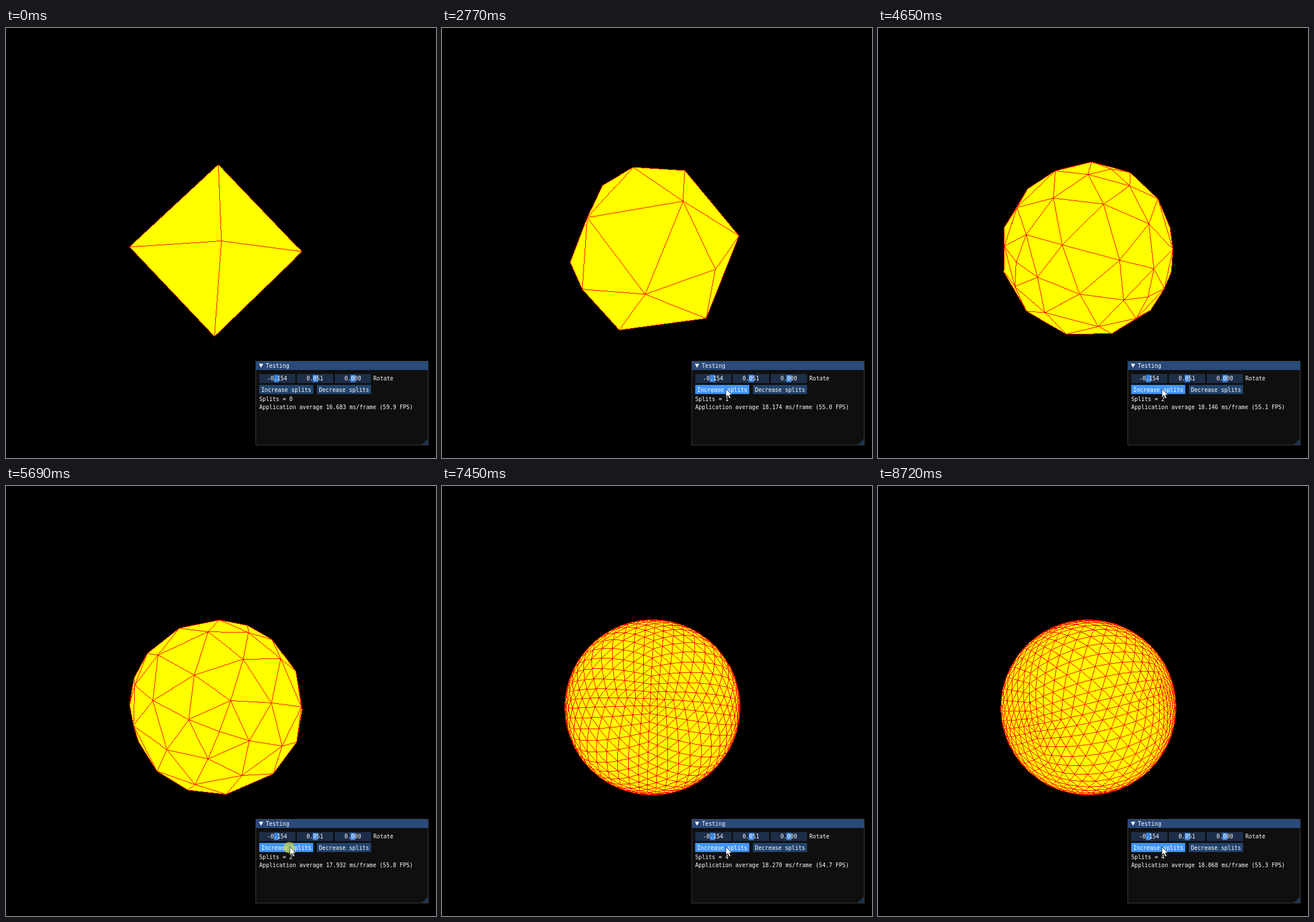
Write an HTML page with a canvas that moves like this. It is 748 by 748 pixels and loops after 8740 ms.

```html
<!DOCTYPE html>
<html lang="en">
<head>
<meta charset="utf-8">
<title>Sphere splits</title>
<style>
  html, body { margin: 0; width: 100%; height: 100%; overflow: hidden; background: #000; }
  canvas { position: absolute; left: 206px; top: 225px; }
  svg { position: absolute; left: 0; top: 0; width: 748px; height: 748px; }
  text { font: 9.67px "DejaVu Sans Mono", "Liberation Mono", monospace; fill: #fff; white-space: pre; }
  .mid { text-anchor: middle; }
</style>
</head>
<body>
<canvas id="stage" width="320" height="320"></canvas>
<svg viewBox="0 0 748 748">
  <rect x="434.5" y="579.5" width="300" height="146" fill="#0f0f0f" stroke="#3c3c44"/>
  <rect x="435" y="580" width="299" height="15" fill="#294a7a"/>
  <path d="M440 584h7.4l-3.7 7z" fill="#fff"/>
  <path d="M734 714v11h-11z" fill="#1b314b"/>
  <text x="452" y="591">Testing</text>

  <g id="sliders"></g>
  <text x="639" y="613.3">Rotate</text>

  <rect id="increase" x="440.5" y="620.9" width="94" height="15.8" fill="#23446c"/>
  <rect x="541" y="620.9" width="94" height="15.8" fill="#23446c"/>
  <text class="mid" x="487.5" y="632.5">Increase splits</text>
  <text class="mid" x="588" y="632.5">Decrease splits</text>
  <text id="splits" x="440.5" y="649"></text>
  <text id="stats" x="440.5" y="663.2"></text>

  <circle id="press" cx="492.5" cy="629" r="10" fill="#dcdc28" fill-opacity=".6"/>
  <path id="cursor" d="M0 0V14L3.3 11L5.8 16.5L8.2 15.4L5.7 10.2H10Z" fill="#fff" stroke="#111" stroke-width=".7"/>
</svg>
<script>
const LOOP = 8740;
const SIZE = 320;
const CENTER = [160, 160], FOCAL = 902, DISTANCE = 6;
const CLICKS = [1700, 3900, 5740, 7000];
const PRESS_TIME = 130;

// Pairs of time and value
const ANGLES = [[0, 2.2], [1860, 83.9], [3640, 173.5], [5690, 271.6], [6740, 319.5], [7450, 358], [8740, 417.5]];
const FRAME_MS = [[0, 16.682], [1860, 17.984], [3640, 18.355], [5690, 17.932], [6740, 18.003], [7450, 18.27], [8720, 18.068], [8740, 18.068]];

const $ = id => document.getElementById(id);
const ctx = $("stage").getContext("2d", { willReadFrequently: true });
const mix = (p, a, q, b) => p.map((v, i) => v * a + q[i] * b);
const cross = (p, q) => [p[1] * q[2] - p[2] * q[1], p[2] * q[0] - p[0] * q[2], p[0] * q[1] - p[1] * q[0]];
const unit = p => { const n = Math.hypot(...p); return p.map(v => v / n); };

function sample(track, t) {
  let i = 1;
  while (i < track.length - 1 && t > track[i][0]) i++;
  const [t0, v0] = track[i - 1], [t1, v1] = track[i];
  return v0 + (v1 - v0) * (t - t0) / (t1 - t0);
}

function octahedron() {
  const faces = [];
  for (const x of [1, -1]) for (const y of [1, -1]) for (const z of [1, -1]) {
    const face = [[x, 0, 0], [0, y, 0], [0, 0, z]];
    faces.push(x * y * z > 0 ? face : face.reverse());
  }
  return faces;
}

function split(faces) {
  const half = (p, q) => mix(p, 0.5, q, 0.5);
  return faces.flatMap(([a, b, c]) => {
    const ab = half(a, b), bc = half(b, c), ca = half(c, a);
    return [[a, ab, ca], [ab, b, bc], [ca, bc, c], [ab, bc, ca]];
  });
}

// Faces are split while flat; only the finished grid is pushed onto the sphere
const flat = [octahedron()];
for (let i = 0; i < CLICKS.length; i++) flat.push(split(flat[i]));
const meshes = flat.map(faces => faces.map(face => face.map(unit)));

// The body spins around a fixed, tilted axis
const axis = unit([0.037, 0.971, 0.235]);
const side = unit(mix([1, 0, 0], 1, axis, -axis[0]));
const depth = cross(axis, side);
const [LEAN_COS, LEAN_SIN] = unit([0.949, 0.314]);

function bodyBasis(degrees) {
  const angle = degrees * Math.PI / 180;
  const right = mix(side, Math.cos(angle), depth, Math.sin(angle));
  const back = cross(axis, right);
  return [
    right,
    mix(axis, LEAN_COS, back, LEAN_SIN),
    mix(axis, LEAN_SIN, back, -LEAN_COS)
  ];
}

function visibleTriangles(faces, [u, v, w]) {
  const project = ([x, y, z]) => {
    const p = mix(mix(u, x, v, y), 1, w, z);
    const scale = FOCAL / (DISTANCE - p[2]);
    return [CENTER[0] + p[0] * scale, CENTER[1] - p[1] * scale];
  };
  return faces.map(face => face.map(project)).filter(([a, b, c]) =>
    (b[0] - a[0]) * (c[1] - a[1]) < (b[1] - a[1]) * (c[0] - a[0]));
}

// One hard pixel per step along the longer direction
function plotLine(pixels, [x0, y0], [x1, y1], color) {
  const steps = Math.max(1, Math.ceil(Math.max(Math.abs(x1 - x0), Math.abs(y1 - y0))));
  for (let i = 0; i <= steps; i++) {
    const x = Math.floor(x0 + (x1 - x0) * i / steps);
    const y = Math.floor(y0 + (y1 - y0) * i / steps);
    pixels[y * SIZE + x] = color;
  }
}

function drawMesh(triangles) {
  ctx.fillStyle = "#000";
  ctx.fillRect(0, 0, SIZE, SIZE);
  ctx.fillStyle = "#ff0";
  ctx.beginPath();
  for (const [a, b, c] of triangles) {
    ctx.moveTo(...a);
    ctx.lineTo(...b);
    ctx.lineTo(...c);
    ctx.closePath();
  }
  ctx.fill();

  const image = ctx.getImageData(0, 0, SIZE, SIZE);
  const pixels = new Uint32Array(image.data.buffer);
  const red = 0xff0000ff;
  for (const [a, b, c] of triangles) {
    for (const [p, q] of [[a, b], [b, c], [c, a]]) {
      // Shared edges always run the same way, so both passes hit the same pixels
      if (p[0] < q[0]) plotLine(pixels, p, q, red);
      else plotLine(pixels, q, p, red);
    }
  }
  ctx.putImageData(image, 0, 0);
}

function buildSliders() {
  $("sliders").innerHTML = [["-0.154", 440.5, 466], ["0.051", 506, 533.5], ["0.000", 572, 599]].map(([value, x, grab]) =>
    `<rect x="${x}" y="601.8" width="63" height="15.8" fill="#1d2e48"/>
     <rect x="${grab}" y="603.5" width="8.8" height="12.5" fill="#3d85e0"/>
     <text class="mid" x="${x + 31.2}" y="613.3">${value}</text>`).join("");
}

function drawCursor(t) {
  const k = Math.min(1, Math.max(0, (t - 250) / 570));
  const ease = 1 - (1 - k) ** 2;
  const x = 520 - 26 * ease, y = 750 - 122 * ease;
  $("cursor").setAttribute("transform", `translate(${x.toFixed(1)} ${y.toFixed(1)})`);
  $("increase").setAttribute("fill", y < 637 ? "#4296fa" : "#23446c");
  const pressed = CLICKS.some(c => t >= c - PRESS_TIME && t < c);
  $("press").setAttribute("visibility", pressed ? "visible" : "hidden");
}

function render(t) {
  const count = CLICKS.filter(c => t >= c).length;
  const ms = sample(FRAME_MS, t);
  drawMesh(visibleTriangles(meshes[count], bodyBasis(sample(ANGLES, t))));
  $("splits").textContent = `Splits = ${count}`;
  $("stats").textContent = `Application average ${ms.toFixed(3)} ms/frame (${(1000 / ms).toFixed(1)} FPS)`;
  drawCursor(t);
}

buildSliders();
const start = performance.now();
function tick() {
  render((performance.now() - start) % LOOP);
  requestAnimationFrame(tick);
}
tick();
</script>
</body>
</html>
```
